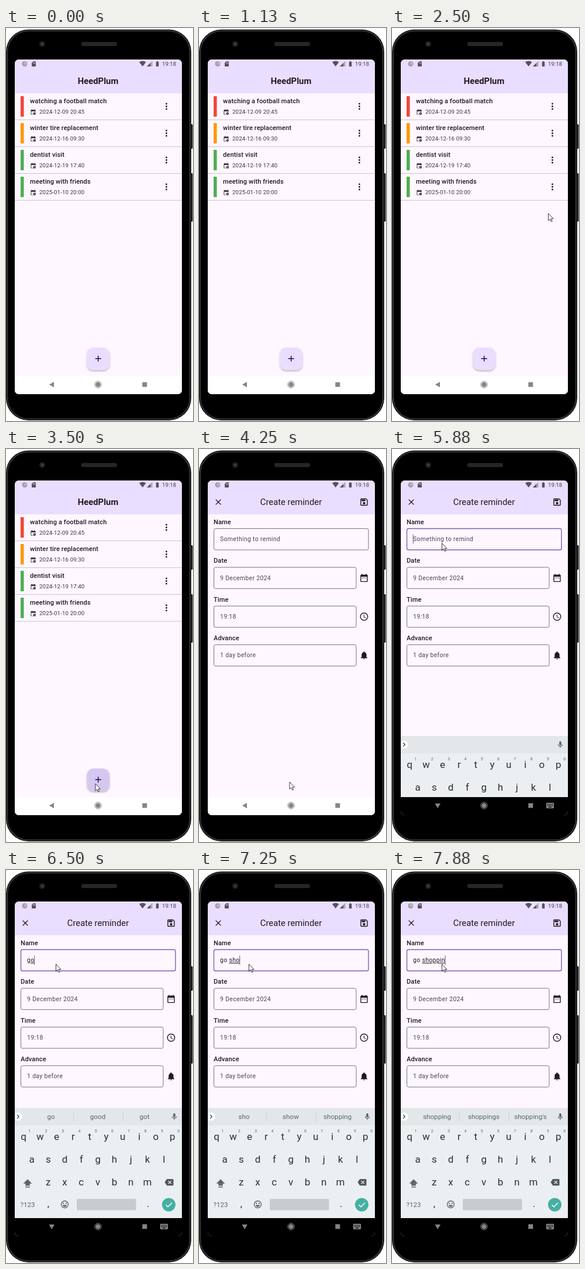
These frames come from a looping animation (320 by 674 pixels, 8 s). An HTML page:

```html
<!DOCTYPE html>
<html lang="en">
<head>
<meta charset="utf-8">
<style>
  html, body { margin: 0; width: 100%; height: 100%; overflow: hidden; background: #fff; }
  svg { display: block; width: 320px; height: 674px; font-family: Roboto, "Noto Sans", sans-serif; }
  text { white-space: pre; fill: #1d1b20; }
  .mid { text-anchor: middle; }
  .strong { font-weight: 500; font-size: 11.1px; letter-spacing: .1px; }
  .date { font-size: 9.7px; letter-spacing: .12px; fill: #38353b; }
  .input { font-size: 10.4px; letter-spacing: .36px; fill: #49454f; }
  .box { fill: none; stroke: #79747e; }
  .key { font-size: 17px; fill: #263238; }
  .hint { font-size: 7px; fill: #5c676c; }
  .word { font-size: 11.7px; fill: #5a666b; }
  #typing { text-decoration: underline #77737c .7px; }
</style>
</head>
<body>
<svg id="stage" viewBox="0 0 320 674"></svg>
<script>
const LOOP = 8000, STEP = 125;
const BAR = '#e9deff', PAGE = '#fef7ff', INK = '#1d1b20', KEYS = '#eceff1', NAV = '#858585';

const ICONS = {
  calendar: 'M19 4h-1V2h-2v2H8V2H6v2H5a2 2 0 0 0-2 2v14a2 2 0 0 0 2 2h14a2 2 0 0 0 2-2V6a2 2 0 0 0-2-2zm0 16H5V9h14zM7 11h2v2H7zm4 0h2v2h-2zm4 0h2v2h-2z',
  event: 'M19 4h-1V2h-2v2H8V2H6v2H5a2 2 0 0 0-2 2v14a2 2 0 0 0 2 2h6v-2H5V10h14v2h2V6a2 2 0 0 0-2-2zM17 13a5 5 0 1 0 0 10 5 5 0 0 0 0-10zm-.6 2h1.2v3l2 1.6-.8 1-2.4-2z',
  clock: 'M12 2a10 10 0 1 0 0 20 10 10 0 0 0 0-20zm0 2a8 8 0 1 1 0 16 8 8 0 0 1 0-16zm-1 3h1.5v5.2l4.5 2.7-.8 1.2L11 13z',
  bell: 'M12 22a2 2 0 0 0 2-2h-4a2 2 0 0 0 2 2zm6-6v-5c0-3.1-1.6-5.6-4.5-6.3V4a1.5 1.5 0 0 0-3 0v.7C7.6 5.4 6 7.9 6 11v5l-2 2v1h16v-1z',
  save: 'M17 3H5a2 2 0 0 0-2 2v14a2 2 0 0 0 2 2h14a2 2 0 0 0 2-2V7zm2 16H5V5h11.2L19 7.8zM12 12a3 3 0 1 0 0 6 3 3 0 0 0 0-6zM6 6h9v4H6z',
  close: 'M19 6.4 17.6 5 12 10.6 6.4 5 5 6.4 10.6 12 5 17.6 6.4 19 12 13.4 17.6 19 19 17.6 13.4 12z',
  mic: 'M12 14a3 3 0 0 0 3-3V5a3 3 0 0 0-6 0v6a3 3 0 0 0 3 3zm5-3a5 5 0 0 1-10 0H5a7 7 0 0 0 6 6.9V21h2v-3.1a7 7 0 0 0 6-6.9z',
  erase: 'M22 3H7c-.7 0-1.2.4-1.6.9L0 12l5.4 8.1c.4.5.9.9 1.6.9h15a2 2 0 0 0 2-2V5a2 2 0 0 0-2-2zm-3 12.6L17.6 17 14 13.4 10.4 17 9 15.6l3.6-3.6L9 8.4 10.4 7l3.6 3.6L17.6 7 19 8.4 15.4 12z',
  shift: 'M12 3 2 13h5v5h10v-5h5zM7 20h10v2H7z',
  keyboard: 'M4 5h16a2 2 0 0 1 2 2v10a2 2 0 0 1-2 2H4a2 2 0 0 1-2-2V7a2 2 0 0 1 2-2zM5 8h2v2H5zm4 0h2v2H9zm4 0h2v2h-2zm4 0h2v2h-2zM5 11h2v2H5zm4 0h2v2H9zm4 0h2v2h-2zm4 0h2v2h-2zM8 15h8v2H8z',
  face: 'M12 2a10 10 0 1 0 0 20 10 10 0 0 0 0-20zm0 2a8 8 0 1 1 0 16 8 8 0 0 1 0-16zM7 8h3v3H7zm7 0h3v3h-3zM7 13.5h10a5 5 0 0 1-10 0z',
  sdcard: 'M18 2h-8L4 8v12a2 2 0 0 0 2 2h12a2 2 0 0 0 2-2V4a2 2 0 0 0-2-2zM9 6h2v4H9zm3.5 0h2v4h-2zm3.5 0h2v4h-2z',
  battery: 'M15.7 4H14V2h-4v2H8.3C7.6 4 7 4.6 7 5.3v15.4c0 .7.6 1.3 1.3 1.3h7.4c.7 0 1.3-.6 1.3-1.3V5.3c0-.7-.6-1.3-1.3-1.3z',
};

const icon = (name, x, y, size = 16.7, fill = INK) =>
  `<path fill="${fill}" fill-rule="evenodd" d="${ICONS[name]}" transform="translate(${x - size / 2} ${y - size / 2}) scale(${size / 24})"/>`;
const text = (x, y, cls, str, extra = '') => `<text x="${x}" y="${y}" class="${cls}" ${extra}>${str}</text>`;
const rect = (x, y, w, h, fill, rx = 0, extra = '') =>
  `<rect x="${x}" y="${y}" width="${w}" height="${h}" rx="${rx}" fill="${fill}" ${extra}/>`;
const circle = (x, y, r, fill, extra = '') => `<circle cx="${x}" cy="${y}" r="${r}" fill="${fill}" ${extra}/>`;

function phone() {
  return rect(314, 165, 5.5, 42, '#1c1c1c', 1.5) + rect(314, 249, 5.5, 83, '#1c1c1c', 1.5) +
    rect(0, 2.5, 317, 670.5, '#1a1a1b', 38) +
    rect(2.5, 5, 312, 665.5, '#000', 36, 'stroke="#3c3c3e" stroke-width="1.4"') +
    rect(129, 24, 61, 7, '#262626', 3) +
    circle(62, 27.5, 5, '#1d1f24') + circle(62, 27.5, 2.2, '#3a3f4b');
}

function statusBar() {
  const gray = '#56535f';
  return circle(32, 61.5, 4.5, '#a09ca9') + circle(33, 60.7, 2.6, '#b9b5c3') +
    icon('sdcard', 47.5, 61.5, 10.5, gray) +
    `<path fill="${gray}" d="M228 58.5Q233.7 54.5 239.5 58.5L233.7 66z"/>` +
    `<path fill="#aaa5b6" d="M250.5 56.5v9.5H241z"/><path fill="${gray}" d="M247 60v6h-6z"/>` +
    icon('battery', 259, 61.5, 10.8, gray) +
    text(267, 65, '', '19:18', 'style="font-size:9.7px;fill:#45424d"');
}

function listPage() {
  const rows = [
    ['watching a football match', '2024-12-09 20:45', '#f44336'],
    ['winter tire replacement', '2024-12-16 09:30', '#ff9800'],
    ['dentist visit', '2024-12-19 17:40', '#4caf50'],
    ['meeting with friends', '2025-01-10 20:00', '#4caf50'],
  ];
  const row = ([name, date, color], i) => `<g transform="translate(0 ${i * 46})">` +
    rect(25, 117, 5.5, 35, color) + text(41, 129, 'strong', name) +
    icon('event', 46.5, 144, 11, '#38353b') + text(57, 147.3, 'date', date) +
    [130, 134.5, 139].map(y => circle(274.5, y, 1.4, INK)).join('') +
    rect(15, 157, 286, 1, '#cac4d0') + '</g>';
  return text(157.5, 95.7, 'mid', 'HeedPlum', 'style="font-size:14.8px;font-weight:700"') +
    rows.map(row).join('') +
    rect(138.5, 548, 38.5, 38.5, BAR, 11, 'filter="url(#lift)"') +
    `<g clip-path="url(#fab)">${circle(157, 576, 0, '#4f378b', 'id="ripple"')}</g>` +
    '<path d="M157.7 562v10M152.7 567h10" stroke="#21005d" stroke-width="1.4"/>';
}

function formPage() {
  const fields = [
    ['Name', '', 264.5],
    ['Date', '9 December 2024', 243.5, 'calendar'],
    ['Time', '19:18', 243.5, 'clock'],
    ['Advance', '1 day before', 243.5, 'bell'],
  ];
  const field = ([label, value, width, name], i) => `<g transform="translate(0 ${i * 66.4})">` +
    text(25, 128.8, 'strong', label) +
    `<rect x="25.5" y="136.5" width="${width}" height="36.5" rx="2.8" class="box" ${i ? '' : 'id="nameBox"'}/>` +
    text(36, 158.2, 'input', value) + (name ? icon(name, 282.5, 154.7) : '') + '</g>';
  return icon('close', 33, 91) + icon('save', 282.5, 91) +
    text(157.5, 95.7, 'mid', 'Create reminder', 'style="font-size:14.8px"') +
    fields.map(field).join('') +
    text(36, 158.2, 'input', 'Something to remind', 'id="placeholder"') +
    text(36, 158.2, 'input', '<tspan id="before"></tspan><tspan id="typing"></tspan>', 'id="typed" style="fill:#1d1b20"') +
    rect(36, 146.5, 1, 16, '#6750a4', 0, 'id="caret"');
}

function keyboard() {
  const row = (letters, x, y) => [...letters].map((c, i) => text(x + i * 28.3, y, 'key mid', c)).join('');
  return rect(15, 408, 286, 189, KEYS) + rect(15, 408, 286, 30, '#e3e7e9') +
    circle(20.5, 423, 7, '#fff') +
    '<path d="M19 419.8l3.2 3.2-3.2 3.2" fill="none" stroke="#37474f" stroke-width="1.3"/>' +
    [0, 1, 2].map(i => text(77 + i * 80, 427.2, 'word mid', '', `id="word${i}"`)).join('') +
    `<g id="dividers">${rect(115, 416, 1, 15, '#cdd2d5') + rect(200, 416, 1, 15, '#cdd2d5')}</g>` +
    icon('mic', 288, 423, 14, '#546066') +
    row('qwertyuiop', 30, 462.5) + row('asdfghjkl', 44, 502) + row('zxcvbnm', 72.2, 541) +
    [...'1234567890'].map((c, i) => text(40.5 + i * 28.3, 449.5, 'hint mid', c)).join('') +
    icon('shift', 37, 537, 18, '#5a666b') + icon('erase', 279, 535.5, 15, '#4b575c') +
    text(37, 577.5, 'mid', '?123', 'style="font-size:11.5px;fill:#5a666b"') +
    text(72.5, 578, 'key mid', ',') + icon('face', 100.5, 573.5, 16, '#5a666b') +
    rect(121, 564, 101.5, 19.5, '#c8cccf', 2) + text(243, 578, 'key mid', '.') +
    circle(278.5, 574, 11.5, '#45b0a4') +
    '<path d="M273.5 574.3l3.5 3.5 7-7" fill="none" stroke="#fff" stroke-width="1.5"/>';
}

function navBar() {
  return rect(15, 597, 286, 32, '#fff', 0, 'id="navBack"') + `<g fill="${NAV}">` +
    '<path id="back" d="M74 611.5l8-4.7v9.4z"/><path id="down" d="M73.5 608h9.4l-4.7 8z"/>' +
    `<circle cx="157.5" cy="611.5" r="4.3"/><circle cx="157.5" cy="611.5" r="5.7" fill="none" stroke="${NAV}"/>` +
    '<path d="M233.3 607.5h8v8h-8z"/>' +
    `<g id="imeIcon">${icon('keyboard', 270.5, 611.5, 16, NAV)}</g></g>`;
}

document.getElementById('stage').innerHTML = `
  <defs>
    <clipPath id="screen"><rect x="15" y="54" width="286" height="574" rx="7"/></clipPath>
    <clipPath id="fab"><rect x="138.5" y="548" width="38.5" height="38.5" rx="11"/></clipPath>
    <clipPath id="content"><rect x="15" y="54" width="286" height="543"/></clipPath>
    <filter id="lift" x="-30%" y="-30%" width="160%" height="170%">
      <feDropShadow dx="0" dy="2" stdDeviation="1.8" flood-color="#000" flood-opacity=".28"/>
    </filter>
  </defs>
  ${phone()}
  <g clip-path="url(#screen)">
    ${rect(15, 54, 286, 575, PAGE)}${rect(15, 54, 286, 58, BAR)}${statusBar()}
    <g id="list">${listPage()}</g>
    <g id="form">${formPage()}</g>
    <g clip-path="url(#content)"><g id="keyboard">${keyboard()}</g></g>
    ${navBar()}
  </g>
  <path id="cursor" d="M.5.5v12.3l2.8-2.6 2 4.3 1.9-.9-2-4.1h3.8z" fill="#fff" stroke="#222" stroke-width=".9"/>`;

const el = Object.fromEntries([...document.querySelectorAll('[id]')].map(n => [n.id, n]));
const show = (node, on) => node.setAttribute('display', on ? 'inline' : 'none');
const progress = (t, from, to) => Math.min(1, Math.max(0, (t - from) / (to - from)));
const smooth = p => p * p * (3 - 2 * p);
const easeOut = p => 1 - (1 - p) ** 2;

// [time, x, y] of the pointer tip
const PATH = [
  [2500, 267, 317.5], [3125, 152.5, 573.5], [4125, 152.5, 573.5], [4250, 154.5, 570.5],
  [5000, 91, 162], [5125, 90, 161], [5250, 90, 161], [5375, 85, 161],
];
function pointer(t) {
  const i = PATH.findIndex(p => p[0] > t);
  if (i < 0) return PATH.at(-1).slice(1);
  const [a, b] = [PATH[Math.max(0, i - 1)], PATH[i]];
  const p = smooth(progress(t, a[0], b[0]));
  return [a[1] + (b[1] - a[1]) * p, a[2] + (b[2] - a[2]) * p];
}

const SUGGESTIONS = {
  'go': 'go good got', 'go ': 'to back for', 'go s': 's see so', 'go sh': 'sh she should',
  'go sho': 'sho show shopping', 'go shop': 'shop shopping shops', 'go shopp': 'shopping shopper shoppers',
  'go shoppi': "shopping shoppings shopping's", 'go shoppin': "shopping shoppings shopping's",
};
function typedAt(t) {
  if (t < 6500) return '';
  if (t < 6625) return 'go';
  const letters = t < 6875 ? 0 : 1 + Math.floor((t - 6875) / 160);
  return 'go ' + 'shoppin'.slice(0, letters);
}

function render(time) {
  const t = Math.floor(time / STEP) * STEP;
  const form = t >= 4250, focus = t >= 5375, ime = t >= 5625, rise = easeOut(progress(t, 5750, 6125));

  show(el.cursor, t >= 2500);
  el.cursor.setAttribute('transform', `translate(${pointer(t)})`);

  show(el.list, !form);
  show(el.form, form);
  const press = progress(t, 3250, 3625);
  el.ripple.setAttribute('r', 36 * easeOut(press));
  el.ripple.setAttribute('opacity', .13 * (1 - progress(t, 3750, 4250)));

  el.nameBox.style.stroke = focus ? '#7862b0' : '';
  el.nameBox.style.strokeWidth = focus ? 1.4 : 1;

  const typed = typedAt(t), cut = typed.lastIndexOf(' ') + 1;
  el.before.textContent = typed.slice(0, cut);
  el.typing.textContent = typed.slice(cut);
  show(el.placeholder, !typed);
  show(el.caret, focus);
  el.caret.setAttribute('x', 35.7 + (typed ? el.typed.getComputedTextLength() : 0));

  const words = (SUGGESTIONS[typed] || '').split(' ');
  for (let i = 0; i < 3; i++) el['word' + i].textContent = words[i] || '';
  show(el.dividers, typed);

  show(el.keyboard, rise > 0);
  el.keyboard.setAttribute('transform', `translate(0 ${189 * (1 - rise)})`);
  el.navBack.setAttribute('fill', rise > 0 ? '#000' : '#fff');
  show(el.back, !ime);
  show(el.down, ime);
  show(el.imeIcon, ime);
}

const start = performance.now();
function frame() {
  render((performance.now() - start) % LOOP);
  requestAnimationFrame(frame);
}
frame();
</script>
</body>
</html>
```
